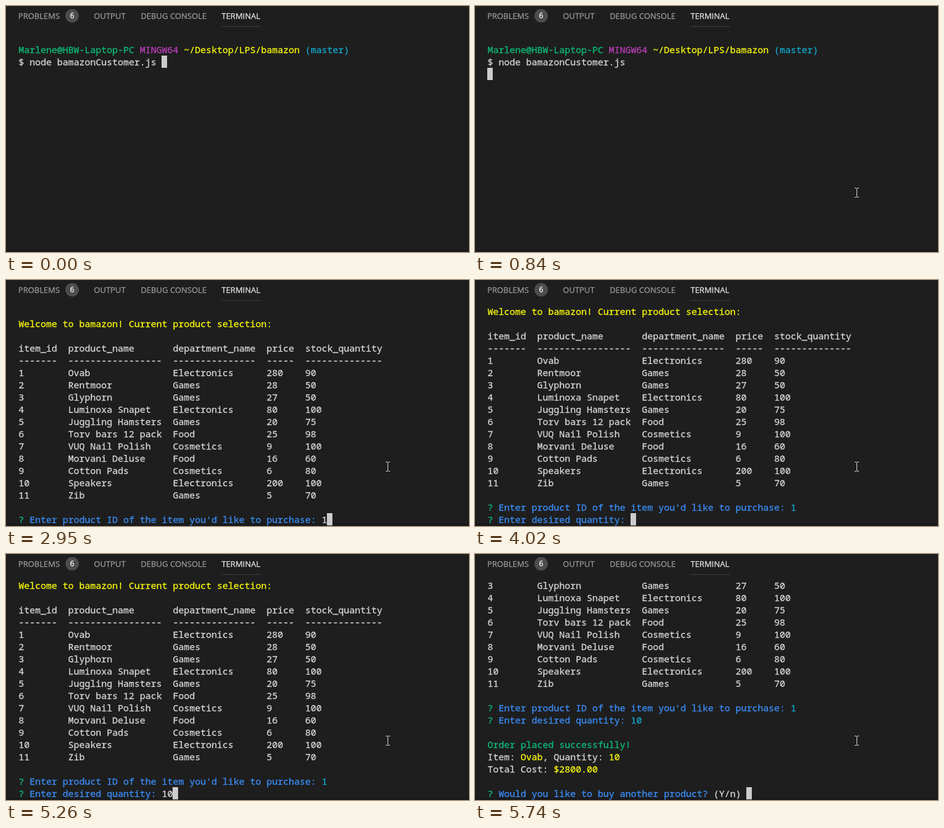
An HTML page that plays this animation: 756 px wide and 402 px high, repeating every 8000 ms.

```html
<!DOCTYPE html>
<html lang="en">
<head>
<meta charset="utf-8">
<title>Terminal session</title>
<style>
  html, body { margin: 0; width: 100%; height: 100%; overflow: hidden; background: #1e1e1e; }
  #stage { position: relative; width: 756px; height: 402px; overflow: hidden; background: #1e1e1e;
    -webkit-text-stroke: .3px currentColor; }
  #stage > * { position: absolute; }
  .tab { top: 6px; font: 13px/20px "Open Sans", "Noto Sans", sans-serif; letter-spacing: .08px; color: #9a9a9a; white-space: pre; }
  .tab.on { color: #e7e7e7; }
  #line { left: 352px; top: 33px; width: 64px; height: 1px; background: #404040; }
  #badge { left: 97px; top: 5px; width: 22px; height: 22px; border-radius: 50%; background: #4d4d4d;
    font: 12px/22px "Open Sans", "Noto Sans", sans-serif; color: #fff; text-align: center; }
  #edge { left: 0; top: 398px; width: 756px; height: 4px; background: #1a191b; }
  #term { left: 20.4px; top: 41px; font: 15px/20px "Noto Sans Mono", "DejaVu Sans Mono", monospace; color: #d8d8d8; }
  #term div { height: 20px; white-space: pre; }
  #caret { width: 9px; height: 20px; background: #ccc; }
  #mouse { left: 0; top: 0; width: 8px; height: 17px; overflow: visible; }
  .g { color: #0dbc79; }
  .m { color: #bc3fbc; }
  .y { color: #fafa0a; }
  .c { color: #11a8cd; }
  .b { color: #3b8ef8; }
</style>
</head>
<body>
<div id="stage">
  <div class="tab" style="left:20px">PROBLEMS</div>
  <div id="badge">6</div>
  <div class="tab" style="left:143.5px">OUTPUT</div>
  <div class="tab" style="left:220px">DEBUG CONSOLE</div>
  <div class="tab on" style="left:352px">TERMINAL</div>
  <div id="line"></div>
  <div id="edge"></div>
  <div id="caret"></div>
  <div id="term"></div>
  <svg id="mouse" shape-rendering="crispEdges">
    <path d="M-3-7.5h3m1 0h3M.5-7v14M-3 7.5h3m1 0h3" fill="none" stroke="#dcdcdc"/>
  </svg>
</div>
<script>
const LOOP = 8000, ROWS = 18, CHAR = 9, ROW = 20, LEFT = 20, TOP = 41;
const $ = id => document.getElementById(id);

// A line is a list of [text, colour class] pieces.
const plain = text => [[text]];
const ask = (text, answer = "", color = "") =>
  [["? ", "g"], [text, "b"], [" "], [answer, color]];

const widths = [9, 19, 17, 7, 0];
const row = cells => plain(cells.map((s, i) => String(s).padEnd(widths[i])).join(""));

const items = [
  ["Ovab", "Electronics", 280, 90],
  ["Rentmoor", "Games", 28, 50],
  ["Glyphorn", "Games", 27, 50],
  ["Luminoxa Snapet", "Electronics", 80, 100],
  ["Juggling Hamsters", "Games", 20, 75],
  ["Torv bars 12 pack", "Food", 25, 98],
  ["VUQ Nail Polish", "Cosmetics", 9, 100],
  ["Morvani Deluse", "Food", 16, 60],
  ["Cotton Pads", "Cosmetics", 6, 80],
  ["Speakers", "Electronics", 200, 100],
  ["Zib", "Games", 5, 70]
];

const shell = [
  plain(""),
  [["Marlene@HBW-Laptop-PC", "g"], [" "], ["MINGW64", "m"], [" "],
   ["~/Desktop/LPS/bamazon", "y"], [" "], ["(master)", "c"]],
  plain("$ node bamazonCustomer.js ")
];
const table = [
  plain(""),
  [["Welcome to bamazon! Current product selection:", "y"]],
  plain(""),
  row(["item_id", "product_name", "department_name", "price", "stock_quantity"]),
  row([7, 17, 15, 5, 14].map(n => "-".repeat(n))),
  ...items.map((item, i) => row([i + 1, ...item])),
  plain("")
];
const askId = (...a) => ask("Enter product ID of the item you'd like to purchase:", ...a);
const askCount = (...a) => ask("Enter desired quantity:", ...a);
const picked = [...table, askId("1", "c")];
const ordered = [...picked, askCount("10", "c"), plain("")];
const receipt = [
  [["Order placed successfully!", "g"]],
  [["Item: "], [items[0][0], "y"], [", Quantity: "], ["10", "y"]],
  [["Total Cost: "], ["$2800.00", "y"]],
  plain(""),
  [...ask("Would you like to buy another product?"), ["(Y/n) "]]
];

const screens = [
  [0, shell],
  [840, [...shell, plain("")]],
  [1620, [...table, askId()]],
  [2950, [...table, askId("1")]],
  [4020, [...picked, askCount()]],
  [5110, [...picked, askCount("1")]],
  [5260, [...picked, askCount("10")]],
  [5660, ordered],
  [5740, [...ordered, ...receipt]]
];
const pointer = [
  [0, null],
  [70, [642, 369]],
  [150, [625, 322]],
  [220, [610, 298]],
  [300, [623, 305]]
];

const at = (steps, t) => steps.reduce((found, [start, value]) => start <= t ? value : found, null);

function showScreen(lines) {
  const view = lines.slice(-ROWS);
  $("term").replaceChildren(...view.map(line => {
    const div = document.createElement("div");
    for (const [text, color = ""] of line) {
      const span = document.createElement("span");
      span.className = color;
      span.textContent = text;
      div.append(span);
    }
    return div;
  }));
  const last = view.length - 1;
  const col = view[last].reduce((n, [text]) => n + text.length, 0);
  $("caret").style.left = LEFT + col * CHAR + "px";
  $("caret").style.top = TOP + last * ROW + "px";
}

function showPointer(pos) {
  const style = $("mouse").style;
  style.visibility = pos ? "visible" : "hidden";
  if (pos) style.transform = `translate(${pos[0]}px, ${pos[1]}px)`;
}

const start = performance.now();
let shown;
function tick() {
  const t = (performance.now() - start) % LOOP;
  const screen = at(screens, t);
  if (screen !== shown) showScreen(shown = screen);
  showPointer(at(pointer, t));
  requestAnimationFrame(tick);
}
tick();
</script>
</body>
</html>
```
